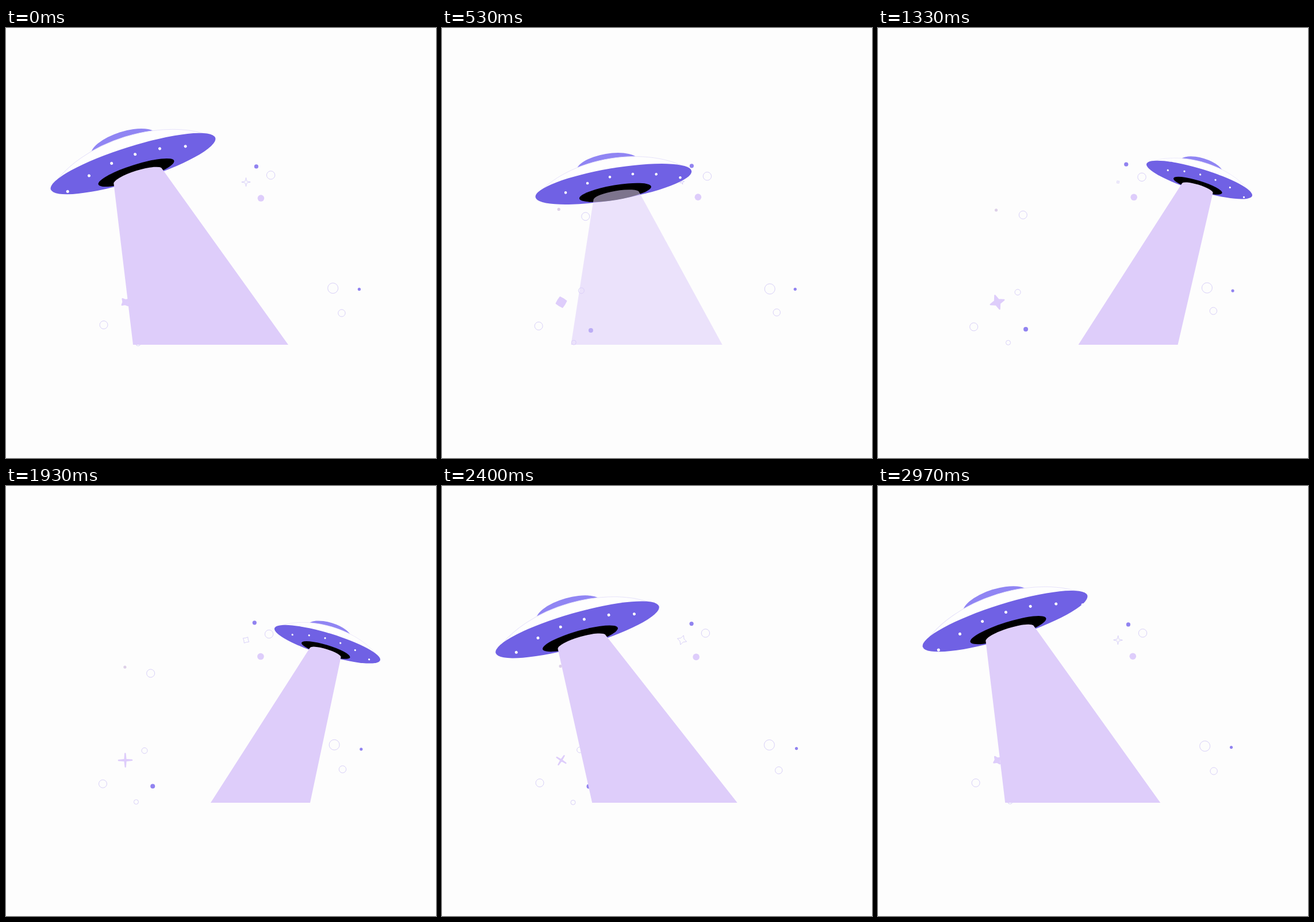
Recreate the animation shown at these times as an HTML page. Size 748 px wide and 748 px high, loop 3010 ms.

```html
<!DOCTYPE html>
<html lang="en">
<head>
<meta charset="utf-8">
<title>Flying saucer</title>
<style>
  html, body { margin: 0; width: 100%; height: 100%; overflow: hidden; background: #fdfdfd; }
  svg { display: block; width: 100vw; height: 100vh; }
  .ring { fill: none; stroke: #d8d0f8; stroke-width: 1; }
</style>
</head>
<body>
<svg viewBox="0 0 748 748">
  <defs>
    <clipPath id="rim"><ellipse rx="150" ry="30"/></clipPath>
  </defs>
  <g id="sky"></g>
  <path id="solidStar" fill="#decdfb" stroke="#decdfb" stroke-width="2.5" stroke-linejoin="round"/>
  <path id="lineStar" class="ring"/>
  <g id="saucer">
    <ellipse cx="-5" cy="-34" rx="61" ry="25" fill="#9085f3"/>
    <path d="M-150 0C-80 -65 80 -65 150 0Z" fill="#fefefe" stroke="#e6e2fa"/>
    <ellipse rx="150" ry="30" fill="#7061e4"/>
    <g id="lights" clip-path="url(#rim)" fill="#fff"></g>
    <ellipse cx="0.6" cy="16.4" rx="69" ry="14" fill="#000"/>
  </g>
  <path id="beam" fill="#decdfa"/>
</svg>
<script>
const LOOP = 3010;
const DEPART = 397, RETURN = 2035, FLIGHT = 422;
const FLOOR = 551;
const SPACING = 43.8;
const VIOLET = '#9183f0', LILAC = '#decdfb';
const $ = id => document.getElementById(id);

function add(parent, name, attrs) {
  const el = document.createElementNS('http://www.w3.org/2000/svg', name);
  for (const key in attrs) el.setAttribute(key, attrs[key]);
  return parent.appendChild(el);
}

function place(el, x, y) {
  el.setAttribute('cx', x);
  el.setAttribute('cy', y);
}

// One cosine swing per loop, highest at `peak`.
const wave = (t, peak) => Math.cos(2 * Math.PI * (t - peak) / LOOP);
const ease = u => .5 - .5 * Math.cos(Math.PI * u);
const flight = (t, start) => Math.min(1, Math.max(0, (t - start) / FLIGHT));

// 0 is the near left pose, 1 the far right pose.
const travel = t => ease(flight(t, DEPART)) - ease(flight(t, RETURN));

// The beam dims to nothing halfway through each flight.
function beamFade(t) {
  const offMiddle = start => Math.abs(flight(t, start) - .5);
  return Math.min(1, 3.1 * offMiddle(DEPART), 3.1 * offMiddle(RETURN));
}

// Smooth looping curve through [time, value] points, without overshoot.
function track(points) {
  const n = points.length;
  const wrap = i => (i + n) % n;
  const time = i => points[wrap(i)][0] + Math.floor(i / n) * LOOP;
  const value = i => points[wrap(i)][1];
  const slope = i => (value(i + 1) - value(i)) / (time(i + 1) - time(i));
  const tangent = i => {
    const a = slope(i - 1), b = slope(i);
    return a * b <= 0 ? 0 : 2 * a * b / (a + b);
  };
  return t => {
    let i = 0;
    while (i + 1 < n && time(i + 1) <= t) i++;
    const span = time(i + 1) - time(i);
    const u = (t - time(i)) / span, w = 1 - u;
    return w * w * ((1 + 2 * u) * value(i) + u * span * tangent(i))
         + u * u * ((1 + 2 * w) * value(i + 1) - w * span * tangent(i + 1));
  };
}

const height = track([[0, 236], [330, 241], [530, 271.5], [800, 272], [1100, 261.5],
                      [1930, 275.2], [2400, 250], [2680, 228.5]]);
const beamCentre = track([[0, 356], [530, 356], [800, 418.5], [1330, 435], [1930, 442.5], [2400, 387.5]]);
const beamWidth = t => 270 - 97 * travel(t - 62);

const bubbles = [
  [433.5, 239, 3.6, VIOLET], [459.5, 257.5, 7.2], [444, 295.5, 5.8, LILAC],
  [570.5, 452, 9], [616, 456, 2.6, VIOLET], [584, 494, 6.2],
  [168.5, 518, 7], [228, 548.5, 4], [257, 524, 4, VIOLET],
  [241.5, 458.5, 5], [250.5, 327, 7], [205, 315, 2.6, '#ddd0e8']
].map(([x, y, r, fill]) => ({ x, y, el: add($('sky'), 'circle', fill ? { r, fill } : { r, class: 'ring' }) }));

const lights = Array.from({ length: 8 }, () => add($('lights'), 'circle', { r: 2.5 }));

function drawStar(el, x, y, tip, notch, spin) {
  const points = Array.from({ length: 8 }, (_, i) => {
    const r = i % 2 ? notch : tip;
    const a = spin * Math.PI / 180 + i * Math.PI / 4;
    return `${x + r * Math.sin(a)} ${y - r * Math.cos(a)}`;
  });
  el.setAttribute('d', `M${points.join('L')}Z`);
}

function drawSky(t) {
  bubbles.forEach(({ el, x, y }, i) =>
    place(el, x + 1.9 * wave(t, i * 450), y + 1.9 * wave(t, i * 1202)));

  drawStar($('solidStar'), 207.5, 477,
    10 + 2.5 * wave(t, LOOP / 2), 3.8 + 3.2 * wave(t, 750), 50 - 360 * t / LOOP);
  const tip = 5.5 + 3.3 * wave(t, 2600);
  drawStar($('lineStar'), 417.5, 268,
    tip, tip * (.45 + .2 * wave(t, 1700)), -90 * t / LOOP);
}

function drawSaucer(t) {
  const p = travel(t);
  const x = 221 + 338 * p, y = height(t);
  const scale = 1 - .36 * p;
  const angle = -17.4 + 34.3 * p;
  $('saucer').setAttribute('transform', `translate(${x} ${y}) rotate(${angle}) scale(${scale})`);

  const shift = (8.3 + 4 * SPACING * t / LOOP) % SPACING;
  lights.forEach((el, i) => {
    const lx = (i - 4) * SPACING + shift;
    place(el, lx, .0016 * (lx - 6) ** 2 - 14.5);
  });

  const a = angle * Math.PI / 180, cos = Math.cos(a), sin = Math.sin(a);
  const world = (lx, ly) => `${x + scale * (lx * cos - ly * sin)} ${y + scale * (lx * sin + ly * cos)}`;
  const centre = beamCentre(t), half = beamWidth(t) / 2;
  $('beam').setAttribute('d',
    `M${world(-42.5, 23.4)}A${44 * scale} ${10 * scale} ${angle} 0 1 ${world(45.5, 23.4)}` +
    `L${centre + half} ${FLOOR}H${centre - half}Z`);
  $('beam').setAttribute('opacity', beamFade(t));
}

const start = performance.now();
function tick() {
  const t = (performance.now() - start) % LOOP;
  drawSky(t);
  drawSaucer(t);
  requestAnimationFrame(tick);
}
tick();
</script>
</body>
</html>
```
